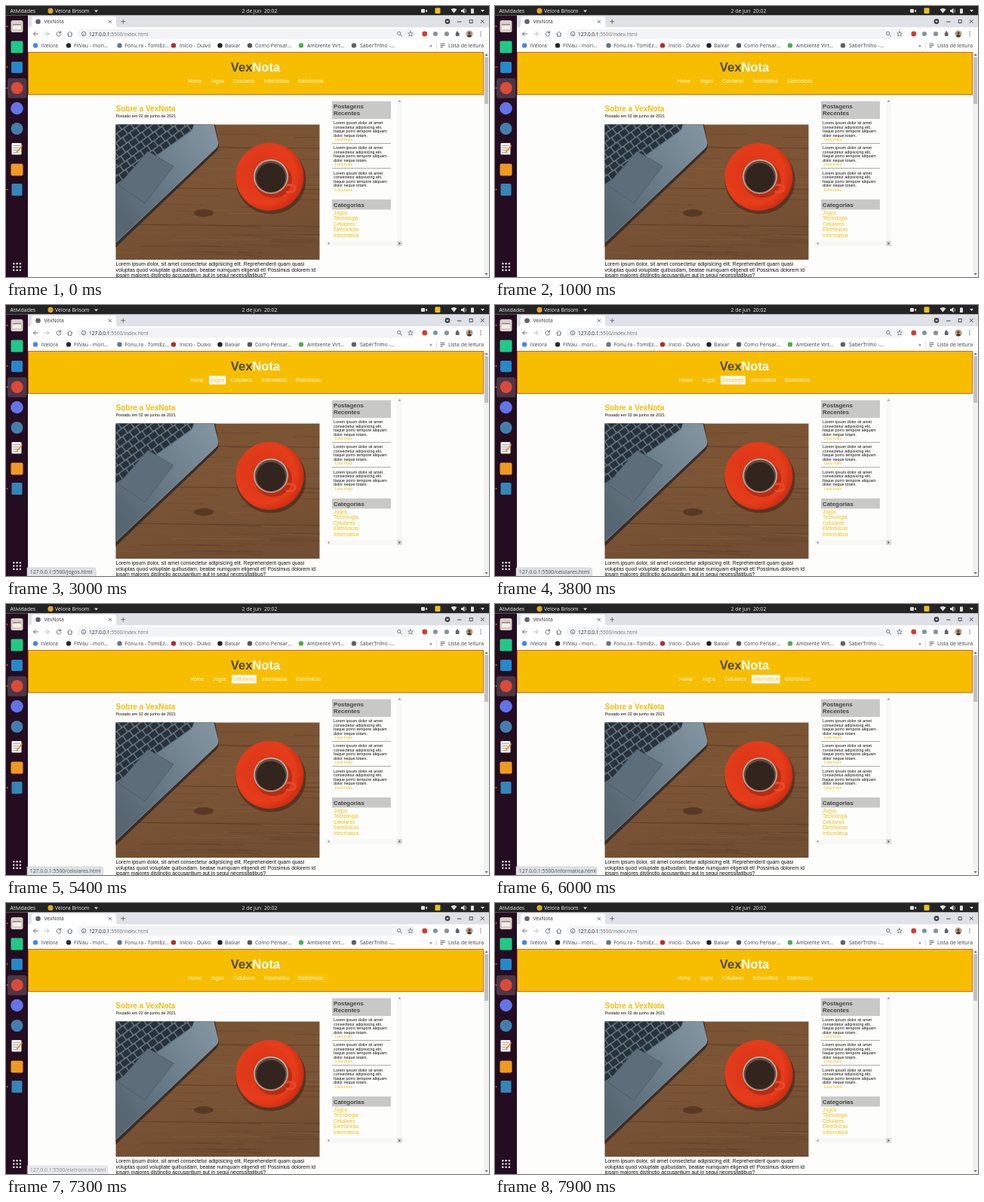
An HTML page for the animation above (8000 ms loop, 640 by 360 pixels).

```html
<!DOCTYPE html>
<html lang="pt-BR">
<head>
<meta charset="utf-8">
<title>VexNota</title>
<style>
html, body { margin: 0; width: 100%; height: 100%; overflow: hidden; background: #fdfdfb; }
svg { display: block; width: 640px; height: 360px; }
text { white-space: pre; }
.ui { font-family: "Open Sans", "Noto Sans", sans-serif; }
.page { font-family: "Liberation Sans", Arial, sans-serif; }
.bold { font-weight: 700; }
</style>
</head>
<body>
<svg id="stage" viewBox="0 0 640 360" xmlns="http://www.w3.org/2000/svg">
  <defs>
    <linearGradient id="wood" x1="0" y1="0" x2="0.3" y2="1">
      <stop offset="0" stop-color="#78522f"/><stop offset="0.5" stop-color="#7c5536"/><stop offset="1" stop-color="#724e32"/>
    </linearGradient>
    <linearGradient id="metal" x1="1" y1="0" x2="0.1" y2="0.8">
      <stop offset="0" stop-color="#8497a3"/><stop offset="0.5" stop-color="#6c7f8b"/><stop offset="1" stop-color="#566772"/>
    </linearGradient>
    <radialGradient id="dish" cx="0.42" cy="0.45" r="0.6">
      <stop offset="0" stop-color="#d63517"/><stop offset="0.75" stop-color="#e63c1a"/><stop offset="1" stop-color="#c92c12"/>
    </radialGradient>
    <clipPath id="photoClip"><rect x="145.5" y="157.5" width="270" height="179.5"/></clipPath>
    <clipPath id="keysClip"><path d="M145 157H249L246 166L145 239Z"/></clipPath>
  </defs>
  <g id="page"></g>
  <g id="nav"></g>
  <g id="chrome"></g>
  <g id="status"></g>
</svg>
<script>
const NS = "http://www.w3.org/2000/svg";
const $ = id => document.getElementById(id);
let layer = $("page");

function add(tag, attrs, parent = layer) {
  const el = document.createElementNS(NS, tag);
  for (const k in attrs) el.setAttribute(k, attrs[k]);
  return parent.appendChild(el);
}
const rect = (x, y, width, height, fill, rx = 0) => add("rect", { x, y, width, height, fill, rx });
const dot = (cx, cy, r, fill) => add("circle", { cx, cy, r, fill });
const fill = (d, color) => add("path", { d, fill: color });
const line = (d, stroke, w = 1) =>
  add("path", { d, stroke, "stroke-width": w, fill: "none", "stroke-linecap": "round" });
function label(x, y, str, size, color, cls = "ui", anchor = "start") {
  const el = add("text", { x, y, "font-size": size, fill: color, class: cls, "text-anchor": anchor });
  el.textContent = str;
  return el;
}
function random(seed) {
  return () => (seed = (seed * 16807) % 2147483647) / 2147483647;
}

const GOLD = "#f5bd0c", BLACK = "#111";

function drawPhoto() {
  const outer = layer;
  layer = add("g", { "clip-path": "url(#photoClip)" });
  rect(145, 157, 272, 180, "url(#wood)");
  const rnd = random(41);
  for (let i = 0; i < 70; i++) {
    const x = 145 + rnd() * 250, y = 157 + rnd() * 180, len = 30 + rnd() * 90;
    add("path", {
      d: `M${x} ${y}q${len / 2} ${rnd() * 4 - 2} ${len} ${rnd() * 3}`,
      stroke: rnd() < 0.55 ? "#4a2f1c" : "#9a7048", "stroke-width": 0.4 + rnd(),
      fill: "none", opacity: 0.25
    });
  }
  for (const y of [186, 241, 290]) line(`M145 ${y}L417 ${y + 3}`, "#513622", 0.7);
  add("ellipse", { cx: 262, cy: 275, rx: 13, ry: 5, fill: "#4a301e", opacity: 0.7 });

  // Laptop
  fill("M145 157H277L282 184Q282 190 278 194L145 321Z", "#3a2d26");
  fill("M145 157H275L281 182Q281 187 277 190L145 315Z", "url(#metal)");
  line("M275 157L281 182Q281 187 277 190L145 315", "#94a5af", 0.7);
  const base = layer;
  layer = add("g", { "clip-path": "url(#keysClip)" });
  rect(145, 157, 110, 90, "#62737e");
  layer = add("g", { transform: "translate(246 166) rotate(144.2)" });
  for (let row = 0; row < 9; row++)
    for (let col = -6; col < 12; col++)
      rect(col * 11.2 + row * 3 + 1, row * 9.2 + 1.2, 9.6, 7.6, "#28323a", 1);
  layer = base;
  add("path", { d: "M188 193L222 213L184 262L149 238Z", fill: "#5d6e7a", stroke: "#465661", "stroke-width": 0.7 });

  // Cup and saucer
  add("ellipse", { cx: 351, cy: 231, rx: 46.5, ry: 45.5, fill: "#2d1a10", opacity: 0.45 });
  add("ellipse", { cx: 349.5, cy: 227, rx: 45, ry: 45, fill: "url(#dish)" });
  add("ellipse", { cx: 354, cy: 231, rx: 25, ry: 24, fill: "#b62c14" });
  line("M371 238Q384 237 383 243Q382 248 372 247", "#e84a29", 3);
  dot(351, 226.5, 23.8, "#d23a1c");
  dot(351, 226.5, 22.8, "#bdb2a6");
  dot(351, 226.8, 21.3, "#5e5046");
  dot(351, 228, 19.3, "#32251e");
  layer = outer;
}

function drawPage() {
  rect(29, 61, 604, 299, "#fdfdfb");
  rect(29.5, 61.5, 603, 56, "#f7be00").setAttribute("stroke", "#df5f18");
  const title = label(330.5, 86.8, "", 16.6, "#4a4a42", "page bold", "middle");
  add("tspan", {}, title).textContent = "Vex";
  add("tspan", { fill: "#fff" }, title).textContent = "Nota";

  label(145.5, 140.4, "Sobre a VexNota", 10, GOLD, "page bold");
  label(145.5, 148.2, "Postado em 02 de junho de 2021", 5.4, BLACK, "page");
  drawPhoto();
  ["Lorem ipsum dolor, sit amet consectetur adipisicing elit. Reprehenderit quam quasi",
   "voluptas quod voluptate quibusdam, beatae numquam eligendi et! Possimus dolorem id",
   "ipsam maiores distinctio accusantium aut in sequi necessitatibus?"
  ].forEach((s, i) => label(145.5, 344.9 + i * 7.6, s, 6.83, BLACK, "page"));

  rect(432, 126.5, 78, 23.5, "#c8c8c6");
  label(434, 136.2, "Postagens", 7.9, "#444", "page bold");
  label(434, 145.2, "Recentes", 7.9, "#444", "page bold");
  [157.2, 190.2, 223.6].forEach((y, n) => {
    ["Lorem ipsum dolor sit amet", "consectetur adipisicing elit.",
     "Itaque porro tempore aliquam", "dolor neque totam."
    ].forEach((s, i) => label(434, y + i * 5.5, s, 5.4, BLACK, "page"));
    label(436, y + 22, "Leia mais", 5.4, GOLD, "page");
    if (n < 2) rect(432, y + 25, 78, 0.8, "#999");
  });
  rect(432, 257, 78, 13.5, "#c8c8c6");
  label(434, 266.6, "Categorias", 7.9, "#444", "page bold");
  ["Jogos", "Tecnologia", "Celulares", "Eletrônicas", "Informática"]
    .forEach((s, i) => label(434, 277 + i * 7.4, s, 6.8, GOLD, "page"));

  // Scrollbars
  rect(518, 122, 7, 190, "#f8f8f6");
  rect(423, 312, 95, 7, "#f8f8f6");
  rect(518, 312, 7, 7, "#dcdcda");
  fill("M519.5 127.5h4l-2 -2.5z", "#999");
  fill("M428.5 313.5v4l-2.5 -2z", "#999");
  fill("M520.5 313.5v4l2.5 -2z", "#666");
  rect(633, 61, 7, 299, "#f1f1f1");
  rect(634, 68, 5, 62, "#c1c1c1");
  fill("M634.6 66h4l-2 -2.5z", "#666");
  fill("M634.6 355h4l-2 2.5z", "#666");
}

function drawTopBar() {
  rect(0, 0, 640, 12.5, "#242424");
  label(5.5, 9.2, "Atividades", 7, "#eee");
  dot(59, 6.4, 3.6, "#dba62c");
  label(65, 9.2, "Velora Brisom", 7, "#eee");
  fill("M117 5.4h5l-2.5 3z", "#ddd");
  label(312.5, 9.2, "2 de jun  20:02", 6.9, "#eee");
  rect(550, 4, 5, 5, "#ddd", 1);
  fill("M555.5 6.5l2.5 -2v4z", "#ddd");
  rect(568.5, 2.5, 7, 7.5, "#e9c320", 1);
  fill("M589.5 4.5q4 -3 8 0l-4 5z", "#ddd");
  fill("M603 5h2l2.5 -2.2v7.4l-2.5 -2.2h-2z", "#ddd");
  line("M609 4.5q1.5 2 0 4", "#ddd", 0.8);
  rect(616, 3.5, 4, 6.5, "#ddd", 0.7);
  fill("M629 5h5l-2.5 3z", "#ddd");
}

function drawDock() {
  rect(0, 12.5, 29, 347.5, "#240d20");
  rect(2, 96, 25.5, 26.5, "#4b3745", 3);
  for (const y of [27, 81, 109, 244]) dot(1.6, y, 1, "#e25a2b");
  rect(6.5, 19, 16, 16, "#d8cfc6", 2.5);
  rect(9, 24, 11, 7.5, "#8f8178", 1);
  rect(9, 25.5, 11, 6, "#f3eee8", 0.8);
  rect(6.5, 46.5, 16, 16, "#21c986", 1.5);
  rect(7, 74, 15, 15, "#2489ca", 2);
  dot(14.7, 109, 8, "#db4a38");
  dot(14.5, 136, 8.3, "#6374e8");
  dot(14.5, 163, 8, "#437fae");
  rect(7.5, 182, 13, 15.5, "#f1efea", 1.3);
  for (let i = 0; i < 4; i++) rect(9.5, 185 + i * 3, i % 2 ? 7 : 9, 0.8, "#999");
  line("M14.5 194L21 186", "#e88e2e", 1.8);
  rect(6.5, 209.5, 16, 16, "#ee9a22", 2);
  rect(7.5, 236, 14, 16, "#3486b8", 1.5);
  for (let i = 0; i < 9; i++) dot(10.3 + (i % 3) * 4.3, 342.3 + Math.floor(i / 3) * 4.3, 1.2, "#f0f0f0");
}

function drawBrowser() {
  const INK = "#5f6368";
  rect(29, 12.5, 611, 16, "#dee1e6");
  fill("M31 28.5Q34 28.5 34 25V17Q34 14 37 14H143Q146 14 146 17V25Q146 28.5 149 28.5Z", "#fff");
  dot(42.5, 20.8, 3.3, INK);
  label(50.5, 23.3, "VexNota", 6.7, "#333");
  line("M136 19l3.6 3.6m0 -3.6l-3.6 3.6", INK, 0.9);
  line("M152.7 20.7h5m-2.5 -2.5v5", INK, 0.9);
  dot(585, 20.5, 3.4, "#3c4043");
  fill("M583.2 19.7h3.6l-1.8 2.2z", "#fff");
  line("M598.5 21h4.5", "#444", 1);
  add("rect", { x: 614.2, y: 18.5, width: 4, height: 4, fill: "none", stroke: "#444", "stroke-width": 0.9 });
  line("M629.3 18.5l4 4m0 -4l-4 4", "#444", 1);

  rect(29, 28.5, 611, 32.5, "#fff");
  line("M42.5 37H36.5m2.7 -2.7l-2.7 2.7l2.7 2.7", INK, 0.9);
  line("M51 37h6m-2.7 -2.7l2.7 2.7l-2.7 2.7", "#b9bbbe", 0.9);
  line("M72 35.2a2.9 2.9 0 1 0 0.8 2.5M72.6 33.7v2.2h-2.2", INK, 0.9);
  line("M81.5 37.2l3.2 -3l3.2 3M82.5 36.5v3.7h4.4v-3.7", INK, 0.9);
  rect(94.5, 30.5, 448, 13, "#f1f3f4", 6.5);
  add("circle", { cx: 103, cy: 37, r: 2.8, fill: "none", stroke: INK, "stroke-width": 0.8 });
  line("M103 36.8v1.6", INK, 0.8);
  const url = label(110, 39.6, "127.0.0.1", 6.5, "#202124");
  add("tspan", { fill: "#73777b" }, url).textContent = ":5500/index.html";
  add("circle", { cx: 520.8, cy: 36.4, r: 2.2, fill: "none", stroke: INK, "stroke-width": 0.8 });
  line("M522.6 38.2l1.8 1.8", INK, 0.9);
  line("M536 33.7l0.9 2.2l2.4 0.2l-1.8 1.6l0.6 2.3l-2.1 -1.3l-2.1 1.3l0.6 -2.3l-1.8 -1.6l2.4 -0.2z", INK, 0.7);
  dot(554.8, 37, 3.4, "#d53b31");
  dot(569, 37, 3, "#7795a5");
  dot(584, 37, 3.1, "#8b9396");
  rect(595.8, 35.2, 4.8, 4.8, INK, 0.8);
  dot(598, 34.8, 1.2, INK);
  dot(614, 37, 4.6, "#b99e86");
  dot(614, 36, 1.6, "#4b352c");
  fill("M610.9 40.3q3.1 -4.4 6.2 0q-3.1 2.5 -6.2 0z", "#4b352c");
  for (const y of [34.6, 37, 39.4]) dot(629, y, 0.75, INK);

  // Bookmarks: icon x, icon colour, text x, text
  [[39, "#4285f4", 46.8, "iVelora"],
   [83, "#24292e", 90, "FilVau - mori…"],
   [150.5, "#667881", 157.5, "Fonu.ra - TomiEz…"],
   [222, "#b92b27", 230, "Início - Dulvo"],
   [283.5, "#202124", 290, "Baixar"],
   [323, "#555", 330, "Como Pensar…"],
   [391, "#4caf50", 399, "Ambiente Virt…"],
   [461, "#5f6368", 469, "SaberTrilho -…"]
  ].forEach(([cx, color, x, s]) => {
    dot(cx, 52.4, 3.2, color);
    label(x, 55, s, 6.9, "#3c4043");
  });
  label(561, 55, "»", 7.5, "#3c4043");
  rect(570.5, 48, 0.6, 9, "#ccc");
  for (let i = 0; i < 3; i++) rect(575.5, 49.8 + i * 2.2, i < 2 ? 6 : 3.5, 1, INK);
  label(586, 55, "Lista de leitura", 6.9, "#3c4043");
}

// Navigation: label, x, width, page, status width, hover start, hover end
const LINKS = [
  ["Home", 241, 18.6, "index", 89, 1250, 2600],
  ["Jogos", 271, 18.2, "jogos", 90, 2600, 3250],
  ["Celulares", 301, 28.8, "celulares", 99.5, 3250, 5450],
  ["Informática", 342, 33.7, "informatica", 106, 5450, 6200],
  ["Eletrônicos", 387, 33.7, "eletronicos", 106, 6200, 6950]
];
const LOOP = 8000, FADE = 400;

drawPage();
layer = $("chrome");
drawTopBar();
drawDock();
drawBrowser();

layer = $("nav");
const items = LINKS.map(([name, x, w]) => ({
  box: rect(x - 5, 94, w + 10, 11.5, "#fffaf0"),
  text: label(x, 102.2, name, 6.8, "#fff", "page")
}));

layer = $("status");
const bubble = add("path", { fill: "#dee1e6", stroke: "#c4c7cc", "stroke-width": 0.6 });
const bubbleText = label(31.8, 357.4, "", 6.85, "#4c4f53");

const clamp = v => Math.max(0, Math.min(1, v));
const ease = v => { v = clamp(v); return v * v * (3 - 2 * v); };
const mix = (a, b, p) => Math.round(a + (b - a) * p);

function render(t) {
  const weights = LINKS.map(l => ease((t - l[5]) / FADE) - ease((t - l[6]) / FADE));
  items.forEach(({ box, text }, i) => {
    const [, x, w] = LINKS[i], p = weights[i];
    const shift = weights.reduce((s, v, j) => s + 3 * v * Math.sign(j - i), 0);
    const pad = 5 - 3 * p;
    text.setAttribute("x", x + shift);
    text.setAttribute("fill", `rgb(${mix(255, 240, p)},${mix(250, 196, p)},${mix(225, 85, p)})`);
    box.setAttribute("x", x + shift - pad);
    box.setAttribute("width", w + 2 * pad);
    box.setAttribute("opacity", p);
  });

  const first = LINKS[0][5], last = LINKS[4][6];
  const current = LINKS.filter(l => t >= l[5] + 80).pop() || LINKS[0];
  const right = 29 + current[4];
  bubble.setAttribute("d", `M28 349H${right - 3}Q${right} 349 ${right} 352V361H28Z`);
  bubbleText.textContent = `127.0.0.1:5500/${current[3]}.html`;
  $("status").setAttribute("opacity", clamp((t - first - 80) / 200) - clamp((t - last - 250) / 300));
}

function tick() {
  render(performance.now() % LOOP);
  requestAnimationFrame(tick);
}
tick();
</script>
</body>
</html>
```
